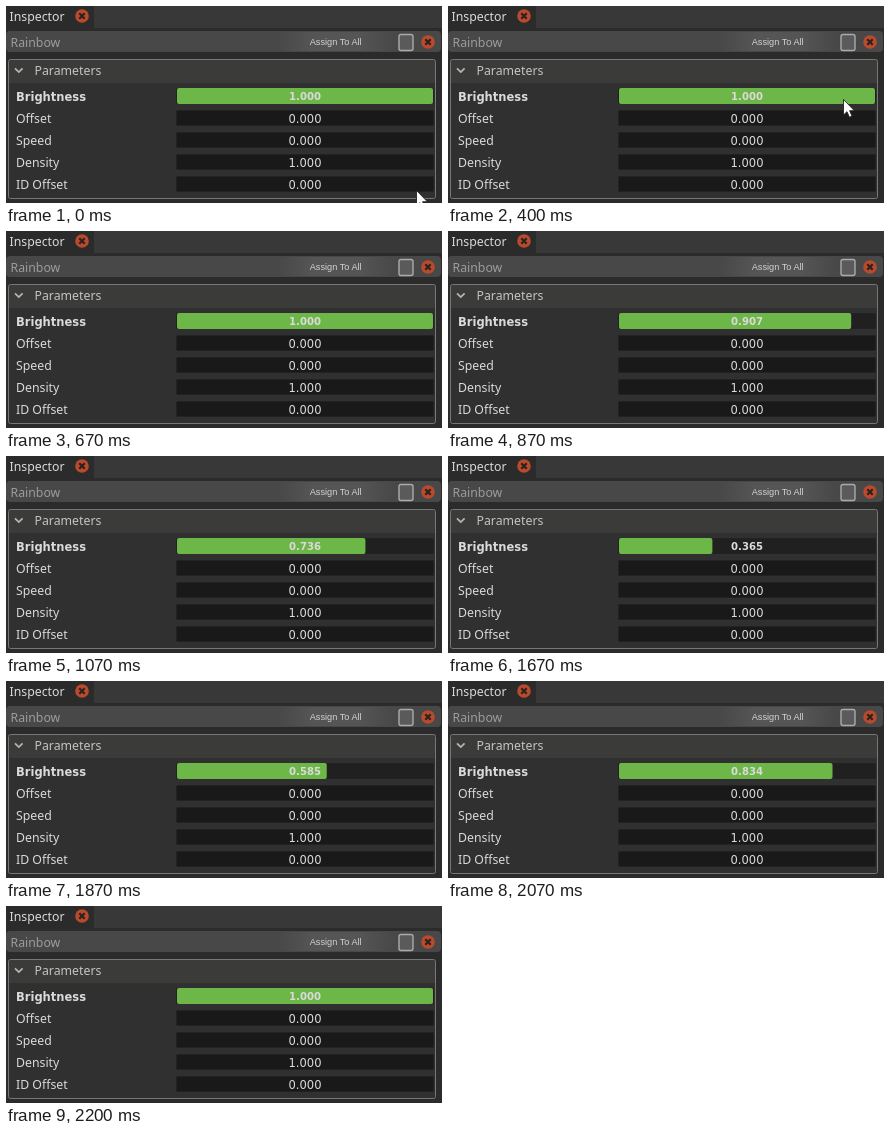
Recreate the animation shown at these times as an HTML page. Size 436 by 197 pixels, loop 4200 ms.

```html
<!DOCTYPE html>
<html lang="en">
<head>
<meta charset="utf-8">
<title>Inspector</title>
<style>
  html, body { margin: 0; width: 100%; height: 100%; overflow: hidden; background: #2b2b2b; }
  svg { display: block; width: 436px; height: 197px; }
  text { font: 12.3px "Noto Sans", sans-serif; fill: #dadada; }
  .bold { font: bold 11.5px "DejaVu Sans", sans-serif; }
  .num { font: 11.5px "DejaVu Sans", sans-serif; text-anchor: middle; }
  #value { font: bold 10.1px "DejaVu Sans", sans-serif; text-anchor: middle; }
  .button { font: 9.2px "Liberation Sans", sans-serif; text-anchor: middle; fill: #d2d2d2; }
</style>
</head>
<body>
<svg viewBox="0 0 436 197">
  <defs>
    <linearGradient id="sheen">
      <stop offset="0" stop-color="#484848"/>
      <stop offset=".3" stop-color="#555"/>
      <stop offset=".7" stop-color="#555"/>
      <stop offset="1" stop-color="#484848"/>
    </linearGradient>
    <g id="close">
      <circle r="6.8" fill="#b84a2d"/>
      <path d="M-2.7-2.7 2.7 2.7M2.7-2.7-2.7 2.7" stroke="#2b211e" stroke-width="2.2"/>
    </g>
  </defs>
  <rect width="436" height="197" fill="#2b2b2b"/>
  <rect x="88" width="348" height="22" fill="#383838"/>
  <text x="3.5" y="15">Inspector</text>
  <use href="#close" x="76" y="10"/>

  <rect y="25" width="435" height="21" rx="4" fill="#484848"/>
  <text x="4.5" y="41" style="fill:#9c9c9c">Rainbow</text>
  <rect x="272" y="26" width="116" height="19" fill="url(#sheen)"/>
  <text class="button" x="329.7" y="39.3">Assign To All</text>
  <rect x="393" y="28.5" width="14" height="16" rx="2" fill="#5a5a5a" stroke="#aaa" stroke-width="1.4"/>
  <use href="#close" x="422" y="36"/>

  <rect x="2.5" y="53.5" width="427" height="139" rx="2" fill="#303030"/>
  <rect x="3" y="54" width="426" height="23" fill="#3b3b39"/>
  <rect x="2.5" y="53.5" width="427" height="139" rx="2" fill="none" stroke="#777"/>
  <path d="M9 62.3l3.8 3.8 3.8-3.8" fill="none" stroke="#b4b4b4" stroke-width="1.8"/>
  <text x="28.5" y="69" style="fill:#c4c4c4">Parameters</text>

  <g id="rows"></g>
  <rect id="bar" x="171" y="82" height="16" rx="2" fill="#6db648"/>
  <text id="value" x="299" y="94"></text>
  <path id="cursor" d="M.5.5V16L4 12.7 6.4 18.2 9 17.1 6.6 11.7H11.4Z" fill="#fff" stroke="#222" stroke-width=".9"/>
</svg>
<script>
  const LOOP = 4200;
  const TICK = 200 / 3;     // the screen updates 15 times a second
  const DRAG_START = 10;    // tick at which the pointer disappears
  const params = [["Brightness"], ["Offset", "0.000"], ["Speed", "0.000"],
                  ["Density", "1.000"], ["ID Offset", "0.000"]];

  // Key points as [tick, ...values], joined by straight lines.
  const dragPath = [[12, 1], [13, .907], [16, .736], [20, .282],
                    [22, .218], [23, .218], [28, .585], [33, 1]];
  const pointerPath = [[0, 410, 184], [2, 399, 102], [5, 399, 102],
                       [6, 395, 93], [8, 392, 89]];

  const byId = id => document.getElementById(id);
  const bar = byId("bar"), value = byId("value"), cursor = byId("cursor");

  byId("rows").innerHTML = params.map(([label, number], i) => {
    const y = 82 + 22 * i;
    const fill = number ? "#191919" : "#202020";
    return `<rect x="170.5" y="${y + .5}" width="257" height="15" rx="1" fill="${fill}" stroke="#222"/>
      <text x="10" y="${y + 12.8}" class="${number ? "" : "bold"}">${label}</text>` +
      (number ? `<text class="num" x="299" y="${y + 12.7}">${number}</text>` : "");
  }).join("");

  function along(path, tick) {
    const next = path.findIndex(([at]) => at > tick);
    if (next <= 0) return path.at(next).slice(1);
    const [from, ...a] = path[next - 1], [to, ...b] = path[next];
    const p = (tick - from) / (to - from);
    return a.map((v, i) => v + (b[i] - v) * p);
  }

  function draw(t) {
    const tick = Math.floor((t + 4) / TICK);   // tick times are rounded to 10 ms

    const [level] = along(dragPath, tick);
    bar.setAttribute("width", 256 * level);
    value.textContent = level.toFixed(3);

    const [x, y] = along(pointerPath, tick);
    cursor.setAttribute("transform", `translate(${x} ${y})`);
    cursor.style.display = tick < DRAG_START ? "" : "none";
  }

  const origin = performance.now();
  function frame() {
    draw((performance.now() - origin) % LOOP);
    requestAnimationFrame(frame);
  }
  frame();
</script>
</body>
</html>
```
